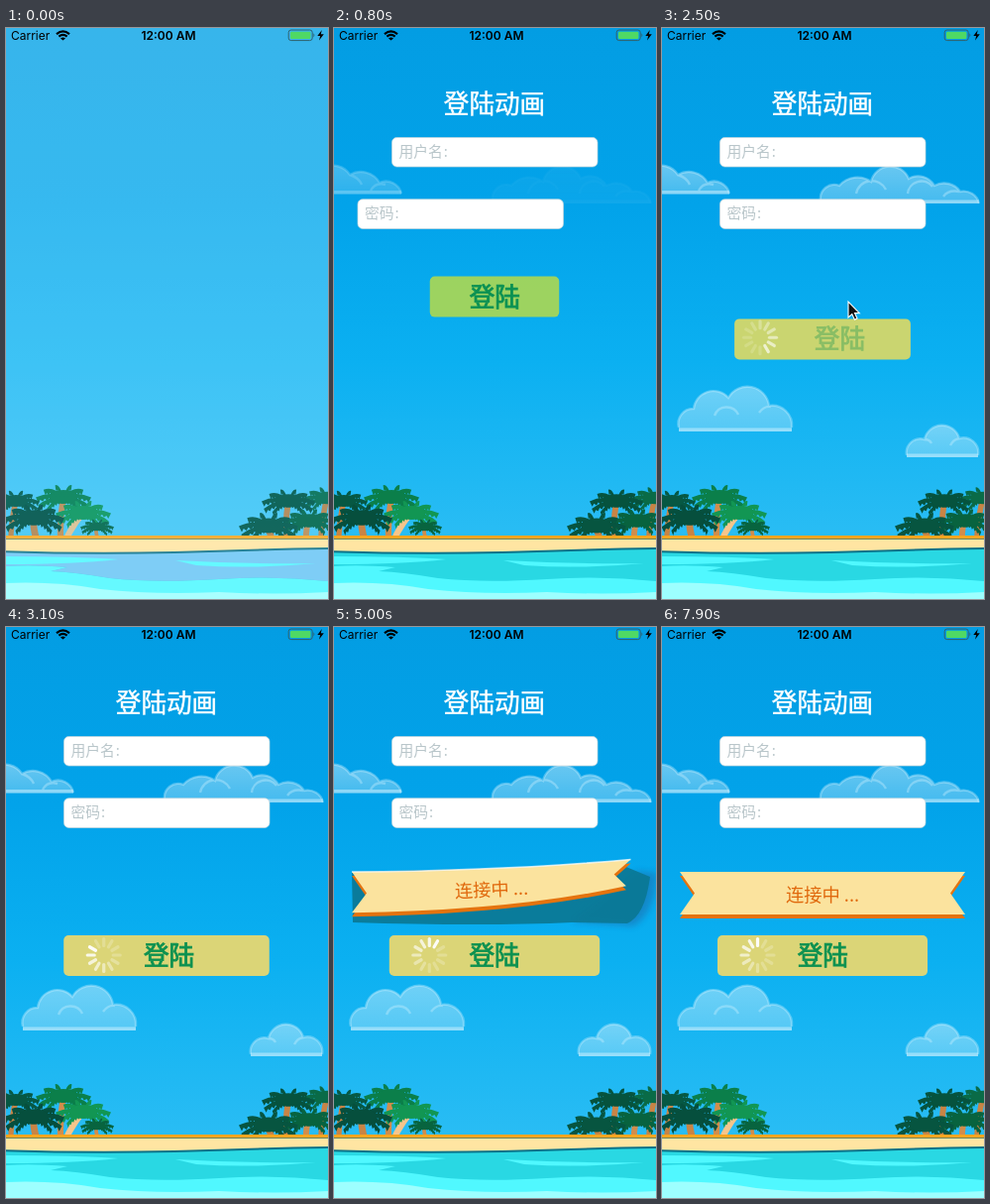
Write an HTML page that moves like this. It is 325 px wide and 576 px high and loops after 8000 ms.

```html
<!DOCTYPE html>
<html lang="zh">
<head>
<meta charset="utf-8">
<title>登陆动画</title>
<style>
  html, body { margin: 0; width: 100%; height: 100%; overflow: hidden; background: #0aa2e8; }
  svg { display: block; width: 100%; height: 100%; }
  text { font-family: "Noto Sans CJK SC", "Noto Sans CJK", sans-serif; }
  .bar { font: 12px Inter, Roboto, sans-serif; }
  .hint { font-size: 14.8px; fill: #b9c6ca; }
</style>
</head>
<body>
<svg id="stage" viewBox="0 0 325 576" preserveAspectRatio="none">
  <defs>
    <linearGradient id="sky" x1="0" y1="0" x2="0" y2="1">
      <stop offset="0" stop-color="#039de3"/>
      <stop offset=".35" stop-color="#02a3ea"/>
      <stop offset=".65" stop-color="#0bb0f1"/>
      <stop offset="1" stop-color="#2abdf4"/>
    </linearGradient>
    <linearGradient id="mist" x1="0" y1="0" x2="0" y2="1">
      <stop offset="0" stop-color="#fff" stop-opacity=".4"/>
      <stop offset="1" stop-color="#fff" stop-opacity=".26"/>
    </linearGradient>
    <filter id="soft" x="-20%" y="-40%" width="140%" height="180%"><feGaussianBlur stdDeviation="3"/></filter>
  </defs>

  <rect width="325" height="516" fill="url(#sky)"/>
  <rect class="veil" width="325" height="516" fill="#c4f2ff" opacity=".27"/>
  <g id="palms"></g>

  <g id="beach">
    <rect y="524" width="325" height="52" fill="#50f8ff"/>
    <path d="M0 525H325V558Q270 552 215 556Q150 560 105 555Q70 549 45 548L62 544Q25 541 0 543Z" fill="#29d8e3"/>
    <path class="veil" d="M0 525H325V558Q270 552 215 556Q150 560 105 555Q70 549 45 548L62 544Q25 541 0 543Z" fill="#6cc6f5"/>
    <path d="M0 533Q70 533 113 536Q70 541 0 541Z M171 537Q250 541 313 540Q250 546 192 542Z" fill="#50f8ff"/>
    <path d="M0 560Q50 558 95 566Q150 572 215 569Q270 572 325 569V576H0Z" fill="#9dffff"/>
    <path d="M-4 515H329V525Q255 526 170 529Q80 531 -4 528Z" fill="#ffe5a2" stroke="#0c7288" stroke-width="2"/>
    <rect y="512" width="325" height="3.4" fill="#f7a51f"/>
    <rect class="veil" y="512" width="325" height="64" fill="#fff" opacity=".12"/>
  </g>

  <g id="clouds"></g>

  <g id="title"><text x="162" y="86" text-anchor="middle" font-size="25.6" fill="#fff" stroke="#fff" stroke-width=".5">登陆动画</text></g>
  <g id="user">
    <rect x="58.5" y="110.5" width="207.5" height="29.5" rx="5" fill="#fff" stroke="#cbd7dc" stroke-width=".7"/>
    <text class="hint" x="65.5" y="129.8">用户名&#8202;:</text>
  </g>
  <g id="pass">
    <rect x="58.5" y="172.8" width="207.5" height="29.7" rx="5" fill="#fff" stroke="#cbd7dc" stroke-width=".7"/>
    <text class="hint" x="65.5" y="192">密码&#8202;:</text>
  </g>

  <g id="banner">
    <g id="shadow">
      <path d="M240 297L302 302Q324 290 326 248L306 246Z" fill="#1d6fae" opacity=".6" filter="url(#soft)"/>
      <path d="M18 247L19 298Q150 302 240 298L296 299Q314 291 319 252L290 240Z" fill="#0b7590" opacity=".95"/>
    </g>
    <path id="under" fill="#e4730f" transform="translate(0 4)"/>
    <path id="ribbon" fill="#fbe39e"/>
    <path id="gloss" fill="none" stroke="#fff" stroke-width="1.6"/>
    <text id="status" text-anchor="middle" font-size="18.3" fill="#e0680c">连接中 ...</text>
  </g>

  <g id="button">
    <rect id="plate" height="41" rx="5"/>
    <g id="spinner"></g>
    <text id="label" y="30" text-anchor="middle" font-size="25.6" fill="#0c9150" stroke="#0c9150" stroke-width=".9">登陆</text>
  </g>

  <g id="statusbar">
    <text class="bar" x="5" y="12">Carrier</text>
    <g fill="none" stroke="#000" stroke-width="2.2">
      <path d="M51 6.2Q57.5 .6 64 6.2M53.4 8.7Q57.5 5.2 61.6 8.7"/>
      <path d="M57.5 12.6L55 10.4Q57.5 8.6 60 10.4Z" fill="#000" stroke="none"/>
    </g>
    <text class="bar" x="164" y="12" text-anchor="middle" style="font-weight:600">12:00 AM</text>
    <rect x="285.2" y="2" width="24" height="10.6" rx="2.5" fill="none" stroke="#2e6270"/>
    <rect x="287" y="3.7" width="20.4" height="7.2" rx="1.2" fill="#4fd964"/>
    <path d="M310.4 5.3Q312.4 7.3 310.4 9.3Z" fill="#2e6270"/>
    <path d="M318.8 2L314.3 8H317.2L316 12.6L320.8 6.3H317.8Z"/>
  </g>

  <path id="cursor" d="M0 0V16L3.8 12.6L6.4 18.2L9 17L6.5 11.6H11.3Z" fill="#111" stroke="#fff" stroke-width="1.1"/>
</svg>

<script>
const LOOP = 8000;
const $ = id => document.getElementById(id);
const clamp = (v, lo = 0, hi = 1) => Math.min(hi, Math.max(lo, v));
const mix = (a, b, p) => a + (b - a) * p;
const ease = p => (p = clamp(p), p * p * (3 - 2 * p));
const ramp = (t, start, length) => ease((t - start) / length);
const move = (id, x, y) => $(id).setAttribute('transform', `translate(${x} ${y})`);
const show = (el, on) => { el.style.display = on ? '' : 'none'; };

// Damped spring from 0 to 1; times in ms, rates per second.
function spring(t, start, decay, freq) {
  const s = (t - start) / 1000;
  if (s <= 0) return 0;
  return 1 - Math.exp(-decay * s) * (Math.cos(freq * s) + decay / freq * Math.sin(freq * s));
}

/* ---- palms: dense crowns of toothed leaves ---- */
const LEAVES = [[-.6, .42], [.6, .42], [-.92, .3], [.92, .3], [-1, .02], [1, .02], [-.72, -.26], [.72, -.26], [-.3, -.42], [.3, -.42]];

function leaf(x, y, dx, dy, r) {
  const cx = dx * .5, cy = dy * .6 - r * .24;
  const at = u => [x + 2 * u * (1 - u) * cx + u * u * dx, y + 2 * u * (1 - u) * cy + u * u * dy];
  let d = `M${x} ${y}Q${x + cx} ${y + cy} ${x + dx} ${y + dy}`;
  for (let u = .84; u > 0; u -= .16) {
    const [ax, ay] = at(u + .06), [bx, by] = at(u);
    d += `L${ax} ${ay + r * .24}L${bx} ${by + r * .15}`;
  }
  return `<path d="${d}Z"/>`;
}

function palm([x, y, r, green, foot, bark]) {
  const trunk = `<path d="M${x} ${y}Q${(x + foot) / 2 - 2} ${(y + 512) / 2} ${foot} 513" fill="none" stroke="${bark}" stroke-width="${r * .22}"/>`;
  const crown = LEAVES.map(([a, b]) => leaf(x, y, a * r, b * r, r)).join('');
  return `${trunk}<g fill="${green}">${crown}<ellipse cx="${x}" cy="${y}" rx="${r * .5}" ry="${r * .25}"/></g>`;
}

$('palms').innerHTML = [
  [58, 473, 28, '#0b7f4a', 55, '#d18d4c'],
  [10, 477, 24, '#075843', 5, '#c88445'],
  [78, 489, 28, '#129653', 62, '#f6c58b'],
  [28, 494, 31, '#064f3d', 30, '#c88445'],
  [92, 503, 17, '#08643f', 92, '#d18d4c'],
  [324, 474, 25, '#0a6b47', 318, '#c88445'],
  [285, 477, 27, '#06533e', 283, '#c88445'],
  [306, 497, 27, '#08633f', 303, '#d18d4c'],
  [265, 502, 30, '#075540', 268, '#c88445']
].map(palm).join('');

/* ---- clouds: bumps are arcs between neighbouring points ---- */
function cloud([points, folds, base]) {
  const arcs = points.slice(1).map(([x, y, r]) => `A${r} ${r} 0 0 1 ${x} ${y}`).join('');
  const [x0, y0] = points[0], x1 = points[points.length - 1][0];
  const d = `M${x0} ${y0}${arcs}`;
  return `<g opacity="0"><path d="${d}V${base}H${x0}Z" fill="url(#mist)"/>
    <path d="${d}${folds}" fill="none" stroke="#d5f3ff" stroke-opacity=".34" stroke-width="2.4"/>
    <rect x="${x0}" y="${base - 3.5}" width="${x1 - x0}" height="3.5" fill="#d5f3ff" opacity=".5"/></g>`;
}

$('clouds').innerHTML = [
  [[[-20, 160], [-10, 141, 15], [16, 148, 20], [46, 156, 22], [68, 167, 16]], 'M16 148Q25 151 28 158M37 164Q42 155 52 158', 167.5],
  [[[160, 174], [179, 159, 14], [211, 155, 24], [249, 152, 20], [275, 159, 19], [301, 165, 20], [320, 177, 16]],
    'M196 167A16 16 0 0 1 226 163M248 167A14 14 0 0 1 273 160M284 170Q289 163 300 165', 177],
  [[[17, 403], [32, 384, 15], [67, 373, 20], [108, 381, 22], [131, 403, 20]], 'M53 391A13 13 0 0 1 77 390M98 388Q103 381 110 382', 407],
  [[[247, 431], [265, 415, 14], [300, 414, 18], [319, 431, 15]], 'M265 415Q270 415 272 419M291 421Q294 415 300 414', 433]
].map(cloud).join('');
const clouds = [...$('clouds').children];

/* ---- spinner ---- */
$('spinner').innerHTML = Array.from({ length: 12 }, (_, i) =>
  `<line y1="-9.5" y2="-16.5" stroke="#fff" stroke-width="3.2" stroke-linecap="round" transform="rotate(${i * 30})"/>`).join('');
const spokes = [...$('spinner').children];

/* ---- ribbon, with its right end lifted while it uncurls ---- */
function drawBanner(t) {
  const open = t >= 4560;
  show($('banner'), open);
  if (!open) return;
  const rest = 1 - ramp(t, 4560, 530);
  const lift = Math.min(4.2, Math.pow(rest * 11.8, .75));
  const fold = Math.min(lift, 2.2);
  const top = `M18 247Q170 ${247 - lift} ${306 - 7 * lift} ${247 - 13.5 * lift}`;
  const d = top +
    `L${291 - 9 * lift} ${268.5 - 13 * lift - 7.5 * fold}` +
    `L${306 - 12 * lift} ${290 - 13 * lift - 18 * fold}Q180 ${290 - 4 * lift} 18 ${290 - 2 * fold}L33 268.5Z`;
  $('ribbon').setAttribute('d', d);
  $('under').setAttribute('d', d);
  $('gloss').setAttribute('d', top);
  $('gloss').setAttribute('opacity', clamp(lift) * .8);
  $('shadow').setAttribute('opacity', clamp(lift));
  $('status').setAttribute('transform', `translate(${162 - 3 * lift} ${277 - 6 * lift}) rotate(${-3 * lift})`);
}

function drawButton(t) {
  const enter = spring(t, 352, 9, 15.6);
  const drop = spring(t, 2390, 12.5, 12.7);
  const grow = spring(t, 2390, 2, 11);
  const width = 130.5 + 81.5 * grow;
  const tint = clamp(drop);
  const rgb = [[160, 212, 94], [219, 213, 119]];
  const pressed = t > 2200 ? 1 - ramp(t, 2400, 400) : 0;

  move('button', 162 - width / 2, 250 + 30 * (1 - enter) + 61 * drop);
  $('button').setAttribute('opacity', clamp(enter));
  $('plate').setAttribute('width', width);
  $('plate').setAttribute('fill', `rgb(${rgb[0].map((c, i) => Math.round(mix(c, rgb[1][i], tint)))})`);
  $('label').setAttribute('x', t < 2390 ? 65.5 : 106.3);
  $('label').setAttribute('opacity', 1 - .78 * pressed);

  move('spinner', mix(-10, 40.5, drop), mix(16, 20, drop));
  $('spinner').setAttribute('opacity', tint);
  const head = Math.round((120 + (t - 3900) * .24) / 30);
  spokes.forEach((s, i) => {
    const age = ((head - i) % 12 + 12) % 12;
    s.setAttribute('opacity', Math.max(.22, .95 - age * .11));
  });
}

const CURSOR = [[900, 330, 345], [1400, 273, 319], [2000, 190, 274], [2200, 188, 276], [2550, 188, 276], [2800, 335, 300]];

function drawCursor(t) {
  const i = CURSOR.findIndex(k => k[0] > t);
  show($('cursor'), i > 0);
  if (i < 1) return;
  const [ta, xa, ya] = CURSOR[i - 1], [tb, xb, yb] = CURSOR[i];
  const p = (t - ta) / (tb - ta);
  move('cursor', mix(xa, xb, p), mix(ya, yb, p));
}

const veils = document.querySelectorAll('.veil');

function render(t) {
  const launching = t < 200;
  veils.forEach(v => show(v, launching));
  $('palms').setAttribute('opacity', launching ? .84 : 1);
  show($('title'), !launching);
  [['title', -398], ['user', 52], ['pass', 202]].forEach(([id, start]) =>
    move(id, -324 * (1 - ramp(t, start, 750)), 0));
  clouds.forEach((c, i) => c.setAttribute('opacity', ramp(t, 352 + i * 300, 750)));
  drawButton(t);
  drawBanner(t);
  drawCursor(t);
}

const begin = performance.now();
function tick() {
  const t = (performance.now() - begin) % LOOP;
  render(Math.floor(t / 100) * 100);
  requestAnimationFrame(tick);
}
tick();
</script>
</body>
</html>
```
